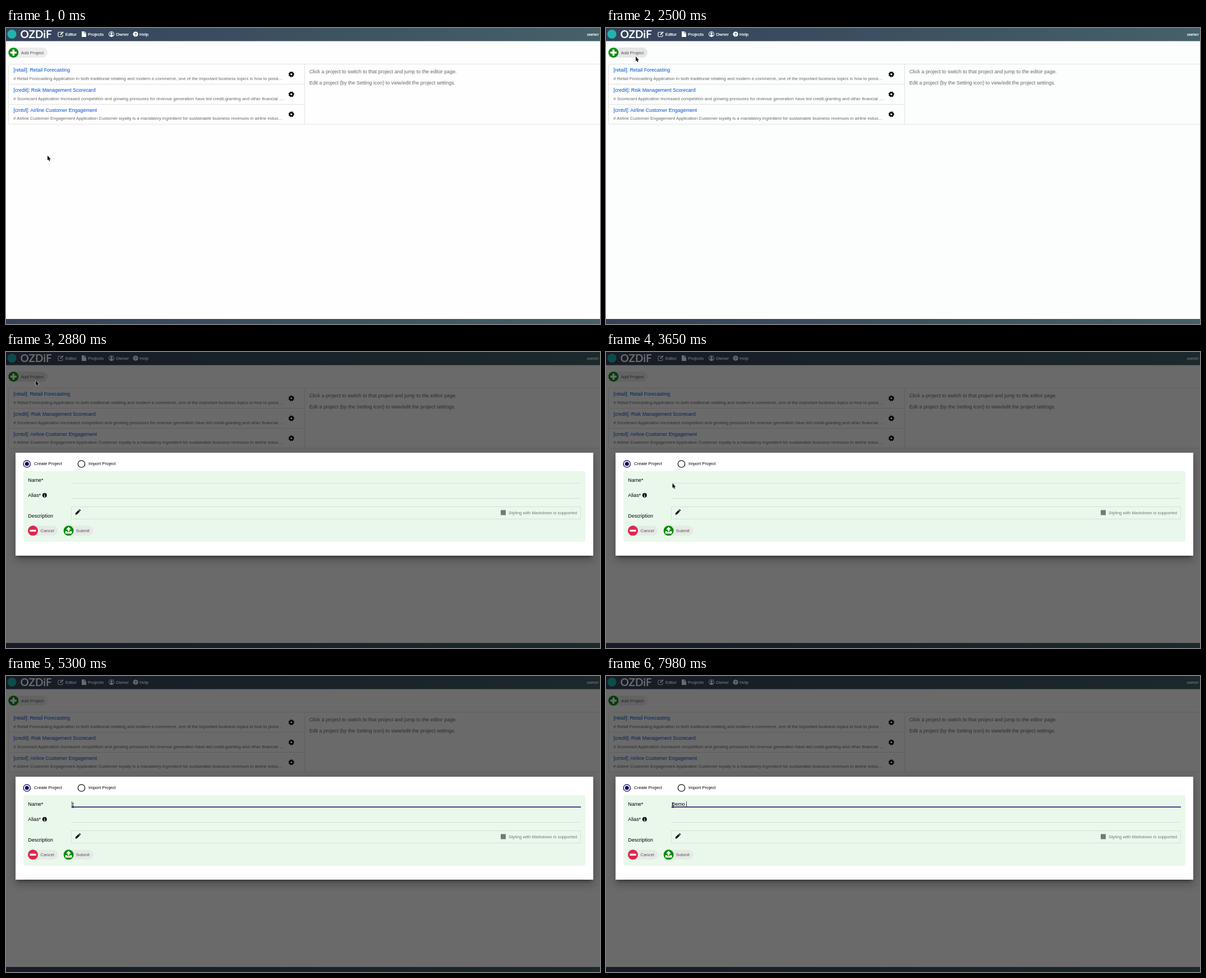
These frames come from a looping animation (1059 by 529 pixels, 8 s). An HTML page:

```html
<!DOCTYPE html>
<html lang="en">
<head>
<meta charset="utf-8">
<title>Add Project</title>
<style>
  html, body { margin: 0; width: 100%; height: 100%; overflow: hidden; background: #fff; }
  #stage { position: relative; width: 1059px; height: 529px; overflow: hidden; }
  svg, #backdrop, #dialog, #typed { position: absolute; left: 0; top: 0; }
  svg { display: block; overflow: visible; }
  svg, #typed { font: 8.92px "Liberation Sans", Arial, sans-serif; }
  .small { font-size: 7.8px; }
  .title { fill: #0052cc; }
  .note { fill: #666; }
  .menu { fill: #fff; stroke: #fff; stroke-width: .22; }
  .brand { font: 700 19px Lato, sans-serif; fill: #fff; }

  /* Every change is a hard step on one shared 8 s clock (1% = 80 ms). */
  #sheet, #pill, #arrow, #ibeam, #backdrop, #dialog, #focus, #typed {
    animation: 8s step-end infinite;
  }
  #sheet { fill: #fefefe; animation-name: sheet; }
  #pill { fill: #ededed; animation-name: pill; }
  #arrow { animation-name: arrow; }
  #ibeam { visibility: hidden; animation-name: ibeam; }
  #backdrop { inset: 0; background: rgba(0, 0, 0, .58); opacity: 0; animation-name: backdrop; }
  #dialog {
    left: 17px; top: 180px; width: 1030px; height: 184px; background: #fff; opacity: 0;
    box-shadow: 0 9px 13.4px 1px rgba(0, 0, 0, .14), 0 3.3px 16.7px 2.8px rgba(0, 0, 0, .12),
      0 4.5px 5.6px -2.8px rgba(0, 0, 0, .4);
    animation-name: dialog;
  }
  #focus { transform-origin: 570.5px 234px; transform: scaleX(0); animation-name: focus; }
  #typed {
    left: 100px; top: 44px; width: 0; height: 10px; line-height: 10px; overflow: hidden;
    white-space: pre; border-right: 1px solid transparent; animation-name: typed, caret;
  }

  @keyframes sheet { 27.625% { fill: #fcfefd; } 33.125% { fill: #fefefe; } }
  @keyframes pill { 22% { fill: #e5e6e5; } 43.75% { fill: #ededed; } }
  @keyframes arrow {
    0% { transform: translate(74px, 228px); }
    6.25% { transform: translate(330px, 180px); }
    8.5% { transform: translate(505px, 146px); }
    10.75% { transform: translate(500px, 151px); }
    16.375% { transform: translate(470px, 140px); }
    18.25% { transform: translate(300px, 102px); }
    20.125% { transform: translate(120px, 66px); }
    22% { transform: translate(53px, 51px); }
    43.75% { transform: translate(88px, 150px); }
    45.625% { transform: translate(118.5px, 234.5px); visibility: visible; }
    49.375% { transform: translate(118.5px, 234.5px); visibility: hidden; }
  }
  @keyframes ibeam { 49.375% { visibility: visible; } }
  @keyframes backdrop { 33.125% { opacity: .7; } 36% { opacity: 1; } }
  @keyframes dialog {
    33.125% { opacity: .43; transform: translateY(-12px); }
    36% { opacity: 1; transform: none; }
  }
  @keyframes focus { 55% { transform: scaleX(.868); } 56.875% { transform: none; } }
  @keyframes typed {
    81.125% { width: .722em; }
    84.875% { width: 1.278em; }
    94.25% { width: 2.111em; }
    96.125% { width: 2.667em; }
    99.75% { width: 2.945em; }
  }
  @keyframes caret {
    55% { border-color: #555; }
    60.625% { border-color: transparent; }
    66.25% { border-color: #555; }
    73.625% { border-color: transparent; }
    79.25% { border-color: #444; }
    92.375% { border-color: transparent; }
    94.25% { border-color: #444; }
  }
</style>
</head>
<body>
<div id="stage">
  <svg width="1059" height="529" viewBox="0 0 1059 529">
    <defs>
      <linearGradient id="bar">
        <stop offset="0" stop-color="#36425b"/>
        <stop offset=".45" stop-color="#3b5060"/>
        <stop offset="1" stop-color="#456169"/>
      </linearGradient>
      <g id="gear" fill="none" stroke="#000">
        <circle r="2.9" stroke-width="2.3"/>
        <circle r="4.2" stroke-width="1.9" stroke-dasharray="1.8 1.499"/>
      </g>
      <path id="pencil" d="M0 10 .7 6.7 6.3 1.1 8.9 3.7 3.3 9.3zM7 .5 7.7 -.2Q8.3 -.7 8.9 -.1L10.1 1.1Q10.7 1.7 10.1 2.4L9.5 3z"/>
    </defs>

    <rect id="sheet" width="1059" height="529"/>
    <rect width="1059" height="23.5" fill="url(#bar)"/>
    <rect y="520" width="1059" height="9" fill="url(#bar)"/>

    <circle cx="10.5" cy="11" r="8" fill="#1fb5ad"/>
    <text class="brand" x="25.5" y="17.8">OZDiF</text>
    <g class="menu small">
      <text x="105.5" y="14">Editor</text>
      <text x="146" y="14">Projects</text>
      <text x="196" y="14">Owner</text>
      <text x="238" y="14">Help</text>
      <text x="1057" y="14" text-anchor="end">owner</text>
    </g>
    <g fill="none" stroke="#fff" stroke-width="1.1">
      <path d="M99 7.5H94.5Q93 7.5 93 9V14Q93 15.5 94.5 15.5H99.5Q101 15.5 101 14V12"/>
      <path d="M97 12 102 7" stroke-width="2"/>
      <circle cx="188" cy="11" r="4.5"/>
    </g>
    <g fill="#fff">
      <path d="M135 6H139.5V9.5H143V16H135zM140.3 6 143 8.7H140.3z"/>
      <circle cx="188" cy="9.7" r="2"/>
      <path d="M184.7 13.9Q185 11.9 188 11.9T191.3 13.9Q188 16.4 184.7 13.9"/>
      <circle cx="231" cy="11" r="4.6"/>
    </g>
    <text x="231" y="13.8" font-size="8" font-weight="700" text-anchor="middle" fill="#3a4a5e">?</text>

    <rect id="pill" x="8" y="35" width="66" height="18" rx="9"/>
    <circle cx="13.3" cy="44" r="9" fill="#078c0c"/>
    <path d="M7.8 44H18.8M13.3 38.5V49.5" stroke="#fff" stroke-width="3.6"/>
    <text class="small" x="26.8" y="46.7" fill="#555">Add Project</text>

    <g fill="none" stroke="#e0e2e1">
      <rect x="4.5" y="64.5" width="1055" height="107.5" rx="3"/>
      <path d="M532.5 64.5V172M5 100.5H532M5 136.5H532"/>
    </g>
    <g>
      <text class="title" x="13.2" y="78.3">[retail]: Retail Forecasting</text>
      <text class="note small" x="13.2" y="92.9"># Retail Forecasting Application In both traditional retailing and modern e-commerce, one of the important business topics is how to possi…</text>
      <use href="#gear" x="508.7" y="82.8"/>
    </g>
    <g>
      <text class="title" x="13.2" y="114.1">[credit]: Risk Management Scorecard</text>
      <text class="note small" x="13.2" y="128.6"># Scorecard Application Increased competition and growing pressures for revenue generation have led credit-granting and other financial …</text>
      <use href="#gear" x="508.7" y="118.5"/>
    </g>
    <g>
      <text class="title" x="13.2" y="149.8">[cmtvl]: Airline Customer Engagement</text>
      <text class="note small" x="13.2" y="164.3"># Airline Customer Engagement Application Customer loyalty is a mandatory ingredient for sustainable business revenues in airline indus…</text>
      <use href="#gear" x="508.7" y="154.2"/>
    </g>
    <g class="note">
      <text x="540.7" y="81">Click a project to switch to that project and jump to the editor page.</text>
      <text x="540.7" y="101.2">Edit a project (by the Setting icon) to view/edit the project settings.</text>
    </g>
  </svg>

  <div id="backdrop"></div>

  <div id="dialog">
    <svg width="1030" height="184" viewBox="17 180 1030 184">
      <g fill="none" stroke-width="1.3">
        <circle cx="37.3" cy="200" r="6.2" stroke="#0a0a5c"/>
        <circle cx="134.5" cy="200" r="6.2" stroke="#111"/>
      </g>
      <circle cx="37.3" cy="200" r="3.6" fill="#0a0a5c"/>
      <g class="small">
        <text x="50" y="201.8">Create Project</text>
        <text x="147" y="201.8">Import Project</text>
      </g>

      <rect x="31" y="213" width="1002" height="126" rx="4" fill="#e9f8ea"/>
      <text x="39.3" y="232">Name*</text>
      <text x="39.3" y="259.3">Alias*</text>
      <text x="39.3" y="295.8">Description</text>
      <circle cx="68.8" cy="256" r="3.9"/>
      <path d="M68.8 253.2V254.3M68 255.6H69V258.3M67.7 258.4H70" stroke="#fff" fill="none"/>

      <g fill="none" stroke="#d5e1d6">
        <path d="M116.5 234.5H1025M116.5 261.5H1025"/>
        <rect x="116.5" y="276.5" width="908" height="22"/>
      </g>
      <rect id="focus" x="116.5" y="233.4" width="908.5" height="1.5" fill="#0f0f60"/>
      <use href="#pencil" transform="translate(123.5 281.5) scale(.93)"/>
      <rect x="882" y="282.5" width="9" height="9" fill="#777"/>
      <text class="small" x="896" y="290" fill="#777">Styling with Markdown is supported</text>

      <rect x="40" y="310.5" width="52.5" height="17.5" rx="8.7" fill="#e6eae6"/>
      <rect x="103" y="310.5" width="52.5" height="17.5" rx="8.7" fill="#e6eae6"/>
      <circle cx="48" cy="319.3" r="9" fill="#dc2850"/>
      <circle cx="111.6" cy="319.3" r="9" fill="#078c0c"/>
      <path d="M42.5 319.3H53.5" stroke="#fff" stroke-width="3.4"/>
      <path d="M111.6 312.5 116 317.2H113.2V321H110V317.2H107.2zM105.8 320.3H109V322H114.2V320.3H117.4V324.5H105.8z" fill="#fff"/>
      <g class="small" fill="#555">
        <text x="61.5" y="322">Cancel</text>
        <text x="124.7" y="322">Submit</text>
      </g>
    </svg>
    <div id="typed">Demo </div>
  </div>

  <svg width="1059" height="529" viewBox="0 0 1059 529">
    <path id="arrow" d="M0 0V8.6L1.9 6.9 3.2 9.9 4.6 9.3 3.3 6.4H5.8z" stroke="#fff" stroke-width=".9" paint-order="stroke"/>
    <path id="ibeam" d="M118 227Q119.5 227 119.5 228V234.5Q119.5 235.5 118 235.5M121 227Q119.5 227 119.5 228M119.5 234.5Q119.5 235.5 121 235.5M118.5 232.5H120.5" fill="none" stroke="#222" stroke-width=".9"/>
  </svg>
</div>
</body>
</html>
```
